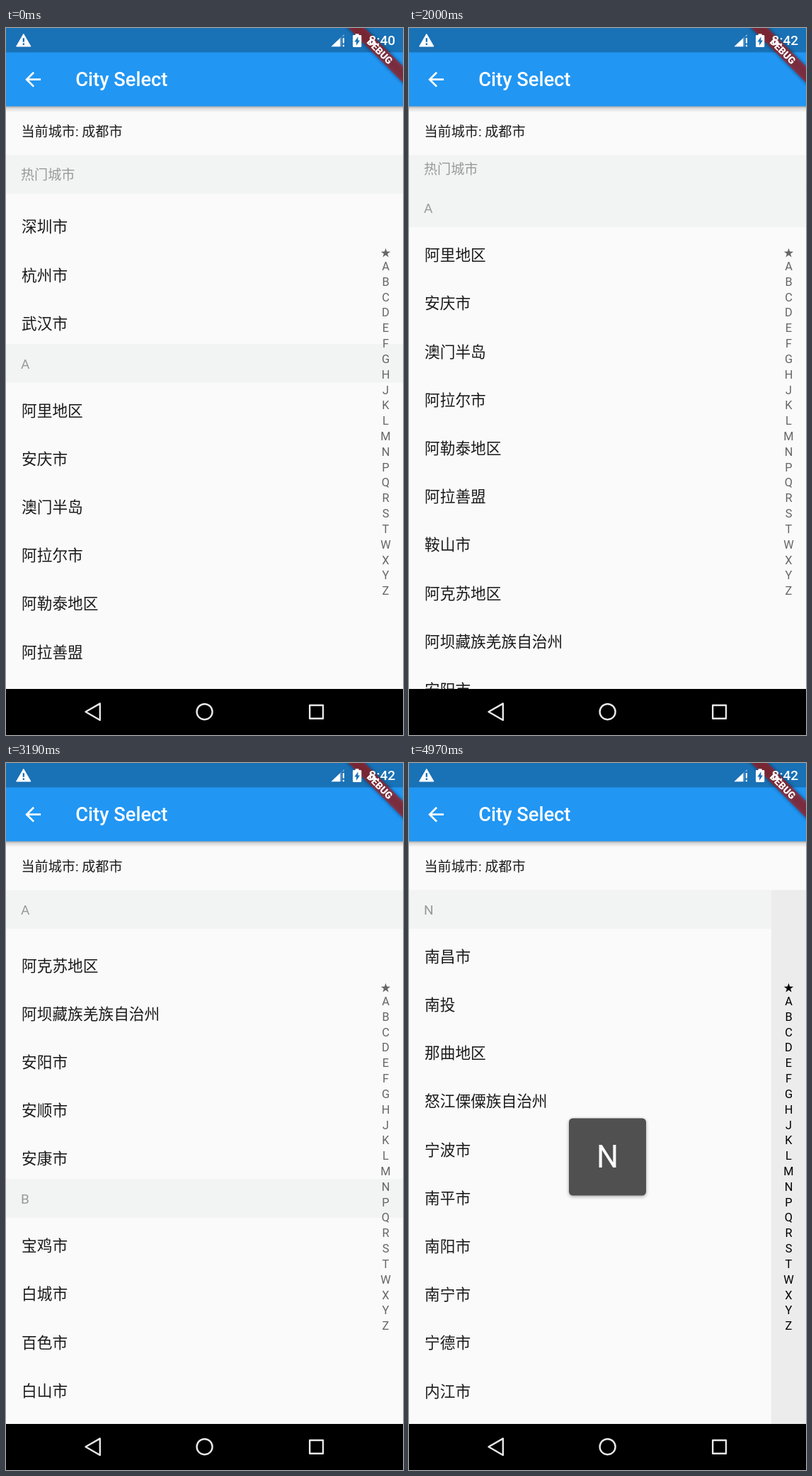
An HTML page for the animation above (5970 ms loop, 561 by 998 pixels).

```html
<!DOCTYPE html>
<html lang="zh-CN">
<head>
<meta charset="utf-8">
<title>City Select</title>
<style>
  html, body { margin: 0; width: 100%; height: 100%; overflow: hidden; background: #fafafa; }
  svg { display: block; width: 100%; height: 100%; }
  text { font-family: Roboto, "Noto Sans CJK SC", "Noto Sans CJK", sans-serif; white-space: pre; }
  .row { font-size: 21.7px; fill: #1a1a1a; }
  .head { font-size: 19.1px; fill: #999; }
  .index { font-size: 16.4px; text-anchor: middle; }
</style>
</head>
<body>
<svg viewBox="0 0 561 998" xmlns="http://www.w3.org/2000/svg">
  <defs>
    <clipPath id="view"><rect y="179.3" width="561" height="753.7"/></clipPath>
    <filter id="soft" x="-20%" y="-60%" width="140%" height="220%"><feGaussianBlur stdDeviation="2.6"/></filter>
    <linearGradient id="drop" x2="0" y2="1">
      <stop offset="0" stop-opacity=".34"/>
      <stop offset=".4" stop-opacity=".12"/>
      <stop offset="1" stop-opacity="0"/>
    </linearGradient>
  </defs>
  <rect width="561" height="998" fill="#fafafa"/>

  <g clip-path="url(#view)">
    <g id="list"></g>
    <g id="sticky">
      <rect y="179.3" width="561" height="54.6" fill="#f2f3f3"/>
      <text id="stickyText" class="head" x="21" y="213.8"></text>
    </g>
    <rect id="press" x="512" y="179.3" width="49" height="753.7" fill="#ececec"/>
    <g id="bar"></g>
    <g id="hint">
      <rect x="226" y="503" width="109" height="109" rx="5.4" opacity=".35" filter="url(#soft)"/>
      <rect x="226" y="501.5" width="109" height="109" rx="5.4" fill="#505050"/>
      <text id="hintText" x="280.5" y="571" font-size="43.6" fill="#fff" text-anchor="middle"></text>
    </g>
  </g>

  <text x="21.5" y="153" font-size="19.1" fill="#1a1a1a">当前城市: 成都市</text>

  <rect y="110" width="561" height="9" fill="url(#drop)"/>
  <rect width="561" height="110.5" fill="#2196f3"/>
  <rect width="561" height="34.4" fill="#1971b6"/>
  <path transform="translate(21.8 56.3) scale(1.364)" fill="#fff"
    d="M20 11H7.83l5.59-5.59L12 4l-8 8 8 8 1.41-1.41L7.83 13H20z"/>
  <text x="98.3" y="82.4" font-size="27.3" font-weight="500" fill="#fff">City Select</text>

  <g transform="translate(561 0) rotate(45)">
    <rect x="-60" y="38.2" width="120" height="16.4" opacity=".5" filter="url(#soft)"/>
    <rect x="-60" y="38.2" width="120" height="16.4" fill="#b71c1c" fill-opacity=".627"/>
    <text y="51.3" font-size="13.9" font-weight="900" fill="#fff" text-anchor="middle">DEBUG</text>
  </g>

  <g fill="#fff">
    <path d="M24.8 8.4L35 26H14.6z" stroke="#fff" stroke-linejoin="round"/>
    <path d="M23.7 14.3h2.3v5.4h-2.3zM23.7 21.6h2.3v2.3h-2.3z" fill="#1971b6"/>
    <path d="M478 8.5V12h-4v14.2h-14.5z" opacity=".35"/>
    <path d="M472 14.6v11.6h-12.5z"/>
    <path d="M475.8 14h2.2v7.5h-2.2zM475.8 23.8h2.2v2.4h-2.2z"/>
    <path d="M493.6 8.2h5v1.9h2.6q1.1 0 1.1 1.1v14.6q0 1.1-1.1 1.1h-10.1q-1.1 0-1.1-1.1V11.200q0-1.100 1.100-1.100h2.500z"/>
    <path d="M497.4 12.300v5.200h2.600l-4.900 7.200v-5.200h-2.700z" fill="#1971b6"/>
    <text id="clock" x="550.2" y="24.200" font-size="19.1" font-weight="500" text-anchor="end"></text>
  </g>

  <rect y="933" width="561" height="65"/>
  <g fill="none" stroke="#e8e8e8" stroke-width="2.4" stroke-linejoin="round">
    <path d="M112.500 965.300L132.800 953.600V977z"/>
    <circle cx="280.600" cy="965.200" r="11"/>
    <rect x="429.200" y="956" width="18.800" height="18.800"/>
  </g>
</svg>
<script>
const LOOP = 5970, TICK = 1000 / 22.5;
const TOP = 179.3, HEAD = 54.6, ROW = 68.2;
const HOT = '热门城市';
const SECTIONS = [
  [HOT, '深圳市 杭州市 武汉市'],
  ['A', '阿里地区 安庆市 澳门半岛 阿拉尔市 阿勒泰地区 阿拉善盟 鞍山市 阿克苏地区 阿坝藏族羌族自治州 安阳市 安顺市 安康市'],
  ['B', '宝鸡市 白城市 百色市 白山市 蚌埠市 保定市 北海市 本溪市 滨州市'],
  ['F', '佛山市 阜新市 阜阳市 福州市 抚顺市 防城港市 抚州市'],
  ['G', '固原市 广安市 广元市 贵港市 桂林市 广州市 赣州市 贵阳市 甘孜藏族自治州 果洛藏族自治州'],
  ['H', '杭州市 合肥市 海口市 哈尔滨市 邯郸市 衡水市 葫芦岛市 黑河市 鹤岗市 淮安市 湖州市'],
  ['J', '济南市 嘉兴市 金华市 锦州市 吉林市 佳木斯市 鸡西市 九江市 吉安市 景德镇市'],
  ['K', '昆明市 开封市 克拉玛依市 喀什地区'],
  ['L', '兰州市 洛阳市 拉萨市 柳州市 丽江市 临沂市 聊城市 连云港市 丽水市 龙岩市 泸州市'],
  ['M', '马鞍山市 茂名市 绵阳市 梅州市 眉山市 牡丹江市'],
  ['N', '南昌市 南投 那曲地区 怒江傈僳族自治州 宁波市 南平市 南阳市 南宁市 宁德市 内江市 南通市']
];
// Drag path: [tick, offset]
const DRAG = [[16, 0], [37, 130.5], [45, 219.5], [58, 342], [72, 731.5], [80, 800]];
// Index touches: [ms, letter]
const TOUCH = [[4180, 'F'], [4220, 'G'], [4310, 'H'], [4440, 'J'], [4530, 'K'], [4790, 'L'], [4880, 'M'], [4970, 'N']];

const $ = id => document.getElementById(id);

function add(parent, tag, attrs, text) {
  const el = document.createElementNS('http://www.w3.org/2000/svg', tag);
  for (const k in attrs) el.setAttribute(k, attrs[k]);
  if (text) el.textContent = text;
  return parent.appendChild(el);
}

const tops = {};
let y = 186.8;
for (const [name, cities] of SECTIONS) {
  tops[name] = y;
  if (name !== HOT) {
    add($('list'), 'rect', { y, width: 561, height: HEAD, fill: '#f2f3f3' });
    add($('list'), 'text', { class: 'head', x: 21, y: y + 34.5 }, name);
  }
  y += HEAD;
  for (const city of cities.split(' ')) {
    add($('list'), 'text', { class: 'row', x: 22, y: y + 47 }, city);
    y += ROW;
  }
}

const star = [...Array(10).keys()].map(i => {
  const a = i * Math.PI / 5, r = i % 2 ? 2.7 : 7;
  return `${536.5 + r * Math.sin(a)},${317.8 - r * Math.cos(a)}`;
});
add($('bar'), 'polygon', { points: star.join(' ') });
[...'ABCDEFGHJKLMNPQRSTWXYZ'].forEach((c, i) =>
  add($('bar'), 'text', { class: 'index', x: 536.5, y: 342 + i * 21.82 }, c));

function slope(i) {
  if (i === 0 || i === DRAG.length - 1) return 0;
  const a = DRAG[i - 1], b = DRAG[i + 1];
  return (b[1] - a[1]) / (b[0] - a[0]);
}

function dragAt(tick) {
  if (tick <= DRAG[0][0]) return 0;
  const i = DRAG.findIndex(k => k[0] > tick) - 1;
  if (i < 0) return DRAG[DRAG.length - 1][1];
  const [t0, p0] = DRAG[i], [t1, p1] = DRAG[i + 1];
  const h = t1 - t0, u = (tick - t0) / h, v = 1 - u;
  return v * v * ((1 + 2 * u) * p0 + u * h * slope(i)) +
         u * u * ((1 + 2 * v) * p1 - v * h * slope(i + 1));
}

function draw(t) {
  const touch = TOUCH.filter(k => t >= k[0]).pop();
  const letter = touch ? touch[1] : '';
  const offset = letter ? tops[letter] - TOP : dragAt(Math.floor((t + 12) / TICK));

  let current = HOT, push = 0;
  for (const [name] of SECTIONS) {
    const top = tops[name] - offset - TOP;
    if (top <= 0.01) current = name;
    else if (name !== HOT) {
      push = Math.min(0, top - HEAD);
      break;
    }
  }
  $('list').setAttribute('transform', `translate(0 ${-offset})`);
  $('sticky').setAttribute('transform', `translate(0 ${push})`);
  $('stickyText').textContent = current;

  const shown = letter ? 'visible' : 'hidden';
  $('press').setAttribute('visibility', shown);
  $('hint').setAttribute('visibility', shown);
  $('hintText').textContent = letter;
  $('bar').setAttribute('fill', letter ? '#000' : '#666');
  $('clock').textContent = t < 50 ? '8:40' : '8:42';
}

const start = performance.now();
function loop() {
  draw((performance.now() - start) % LOOP);
  requestAnimationFrame(loop);
}
loop();
</script>
</body>
</html>
```
